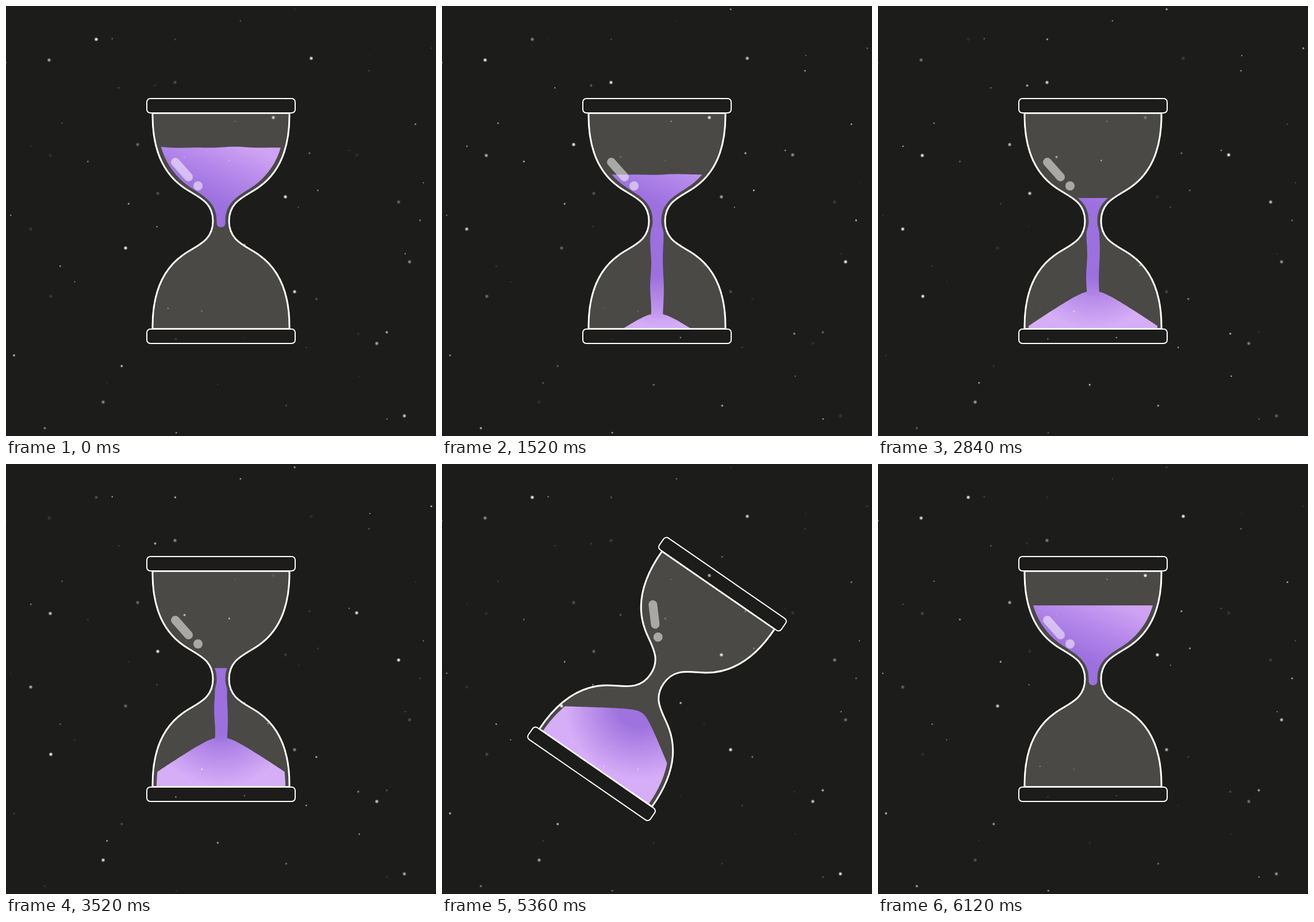
Animation of 748x748 px, one loop 6.16 s. Source, as an HTML page:

```html
<!DOCTYPE html>
<html lang="en">
<head>
<meta charset="utf-8">
<title>Hourglass</title>
<style>
  html, body { margin: 0; width: 100%; height: 100%; overflow: hidden; background: #1c1c1a; }
  svg { display: block; width: 100vw; height: 100vh; }
</style>
</head>
<body>
<svg viewBox="0 0 748 748">
  <defs>
    <linearGradient id="topFill" gradientUnits="userSpaceOnUse" x1="405" y1="236" x2="360" y2="340">
      <stop offset="0" stop-color="#cfa3f3"/><stop offset=".5" stop-color="#b487ea"/><stop offset="1" stop-color="#9c70de"/>
    </linearGradient>
    <linearGradient id="streamFill" gradientUnits="userSpaceOnUse" x1="0" y1="470" x2="0" y2="555">
      <stop offset="0" stop-color="#9c70de"/><stop offset="1" stop-color="#d0a5f4"/>
    </linearGradient>
    <radialGradient id="moundFill" gradientUnits="userSpaceOnUse" cx="374" cy="430" r="130">
      <stop offset=".3" stop-color="#9f73df"/><stop offset="1" stop-color="#d6adf7"/>
    </radialGradient>
    <radialGradient id="starFill">
      <stop offset=".2" stop-color="#fff"/><stop offset=".55" stop-color="#fff" stop-opacity=".6"/><stop offset="1" stop-color="#fff" stop-opacity="0"/>
    </radialGradient>
    <clipPath id="inside"><path id="innerWall"/></clipPath>
  </defs>
  <rect width="748" height="748" fill="#1c1c1a"/>
  <g id="hourglass">
    <path id="glass" fill="#4a4946"/>
    <g clip-path="url(#inside)">
      <path id="upper" fill="url(#topFill)"/>
      <path id="mound" fill="url(#moundFill)"/>
    </g>
    <path id="stream" fill="url(#streamFill)"/>
    <path id="outline" fill="none" stroke="#fff" stroke-width="3"/>
    <g id="shine" stroke="#fff" stroke-linecap="round" fill="#fff">
      <path d="M294.5 271.5L317.5 297.5" stroke-width="15"/>
      <circle cx="334" cy="313" r="8" stroke="none"/>
    </g>
    <g fill="#1c1c1a" stroke="#fff" stroke-width="2">
      <rect x="245" y="161" width="258" height="25" rx="6"/>
      <rect x="245" y="562" width="258" height="25" rx="6"/>
    </g>
    <path d="M254 186.3H494M254 561.7H494" stroke="#fff" stroke-width="2.6"/>
  </g>
  <g id="stars" fill="url(#starFill)"></g>
</svg>
<script>
const SIZE = 748, MID = SIZE / 2, FLOOR = 562, LEVEL = 246;
const LOOP = 6160, STEP = 40, LANDING = 600, TWINKLE = 5600;
const TURN_START = 5000, TURN_TIME = 1055, TURN_END = TURN_START + TURN_TIME;

const $ = id => document.getElementById(id);
const set = (id, name, value) => $(id).setAttribute(name, value);
const lerp = (a, b, k) => a + (b - a) * k;
const ramp = (t, a, b) => Math.min(1, Math.max(0, (t - a) / (b - a)));
const smooth = k => k * k * (3 - 2 * k);
const easeInOut = k => k < .5 ? .5 * (2 * k) ** 2.5 : 1 - .5 * (2 - 2 * k) ** 2.5;
const polygon = points => 'M' + points.map(p => p.map(v => v.toFixed(2)).join(' ')).join('L') + 'Z';

// Mirrors one quarter of the wall into the full silhouette.
function wall(quarter) {
  const left = quarter.concat(quarter.slice(0, -1).reverse().map(([x, y]) => [x, SIZE - y]));
  const right = left.map(([x, y]) => [SIZE - x, y]).reverse();
  const curve = p => `${p[0]}C${p.slice(1).join(' ')}`;
  return `M${curve(left)}L${curve(right)}Z`;
}
const outer = wall([[255, 186], [254, 250], [274, 291], [308, 315], [330, 331], [360, 338], [360, 374]]);
set('glass', 'd', outer);
set('outline', 'd', outer);
set('innerWall', 'd', wall([[262, 186], [262, 250], [283, 286], [313, 310], [335, 327], [366.5, 336], [366.5, 374]]));

// The pile grows at an even rate; turning pushes its rounded tip into the neck.
const peakHeight = (t, turn) => 107 * ramp(t, LANDING, 4200) + 92 * turn;

function moundPath(t, turn) {
  const peak = peakHeight(t, turn), slope = .68 * (1 - turn ** 2), tip = MID + 60 * turn;
  const round = lerp(25, 15, ramp(turn, 0, .2));
  const points = [];
  for (let x = 256; x <= 492; x += 4)
    points.push([x, FLOOR - peak + slope * (Math.hypot(x - tip, round) - round)]);
  // The base comes loose on the high side first.
  const lift = (from, to) => (FLOOR - SIZE + LEVEL - 1) * smooth(ramp(turn, from, to));
  points.push([492, FLOOR - lift(.65, 1)], [256, FLOOR - lift(.35, .95)]);
  return polygon(points);
}

function upperPath(t, level) {
  const points = [[500, MID + 1], [248, MID + 1]];
  const swell = .8 * (1 - ramp(t, 1200, 2100));
  for (let x = 248; x <= 500; x += 6)
    points.push([x, level + swell * (Math.sin(x / 11 + t / 130) * .6 + Math.sin(x / 23 - t / 210))]);
  return polygon(points);
}

function streamPath(t, top, end, falling) {
  const left = [], right = [];
  const edge = y => {
    let half = 7.5 + 3.5 * smooth(ramp(y, 376, 396));
    if (falling && y > end - 9) half *= Math.sqrt(Math.max(0, 1 - ((y - end + 9) / 9) ** 2));
    const wobble = .9 * ramp(y, 385, 410);
    left.push([MID - half + wobble * Math.sin(y / 13 - t / 75), y]);
    right.unshift([MID + half + wobble * Math.sin(y / 17 - t / 90 + 2), y]);
  };
  for (let y = top; y < end; y += 1.5) edge(y);
  edge(end);
  return polygon(left.concat(right));
}

let seed = 7;
const random = () => (seed = seed * 16807 % 2147483647) / 2147483647;
const stars = [];
function addStar(x, y, r, peak, bright) {
  const node = document.createElementNS('http://www.w3.org/2000/svg', 'circle');
  for (const [name, value] of Object.entries({ cx: x, cy: y, r })) node.setAttribute(name, value);
  $('stars').append(node);
  stars.push({ node, peak, bright });
}

// The brightest stars light up one after another, in this order.
const brightStars = [
  [157, 58], [486, 332], [531, 91], [465, 194], [75, 94], [702, 445], [229, 241],
  [294, 133], [43, 388], [77, 260], [610, 259], [78, 505], [264, 326], [683, 341],
  [169, 689], [645, 587], [693, 713], [502, 497], [208, 421]
];
brightStars.forEach(([x, y], i) => addStar(x, y, 3.8, TWINKLE * i / brightStars.length, 1));

// Faint stars: one scattered in each cell of a coarse grid.
const CELLS = 7, CELL = SIZE / CELLS;
for (let i = 0; i < CELLS * CELLS; i++) {
  const x = (i % CELLS + random()) * CELL, y = (Math.floor(i / CELLS) + random()) * CELL;
  addStar(x, y, lerp(1.4, 2.8, random()), TWINKLE * random(), .75);
}

function draw(t) {
  const turning = t >= TURN_START && t < TURN_END;
  const pour = t < TURN_END ? t : 0;
  const turn = turning ? easeInOut((t - TURN_START) / TURN_TIME) : 0;
  set('hourglass', 'transform', `rotate(${180 * turn} ${MID} ${MID})`);

  const falling = pour < LANDING;
  const level = LEVEL + .031 * pour + 130 * (Math.max(0, pour - 3650) / 1000) ** 2;
  const top = Math.max(MID, level);
  const end = falling ? 385 + 177 * (pour / LANDING) ** 2 : FLOOR - peakHeight(pour, turn) + 8;
  set('upper', 'd', !turning && level < MID ? upperPath(t, level) : '');
  set('stream', 'd', !turning && top < end ? streamPath(pour, top, end, falling) : '');
  set('mound', 'd', falling ? '' : moundPath(pour, turn));
  set('moundFill', 'cy', lerp(430, 395, turn ** 2));
  set('moundFill', 'r', lerp(130, 112, turn ** 2));

  // The reflection fades on the way over and returns on the other side.
  const flipped = turn > .6;
  set('shine', 'transform', flipped ? `rotate(180 ${MID} ${MID})` : '');
  set('shine', 'opacity', .52 * (flipped ? ramp(turn, .65, .95) : 1 - ramp(turn, .25, .6)));

  for (const { node, peak, bright } of stars) {
    const glow = Math.cos(Math.PI * (t - peak) / TWINKLE) ** 2;
    node.setAttribute('opacity', lerp(.08, bright, glow).toFixed(3));
  }
}

const start = performance.now();
function tick() {
  const elapsed = (performance.now() - start) % LOOP;
  draw(Math.floor(elapsed / STEP) * STEP);
  requestAnimationFrame(tick);
}
tick();
</script>
</body>
</html>
```
